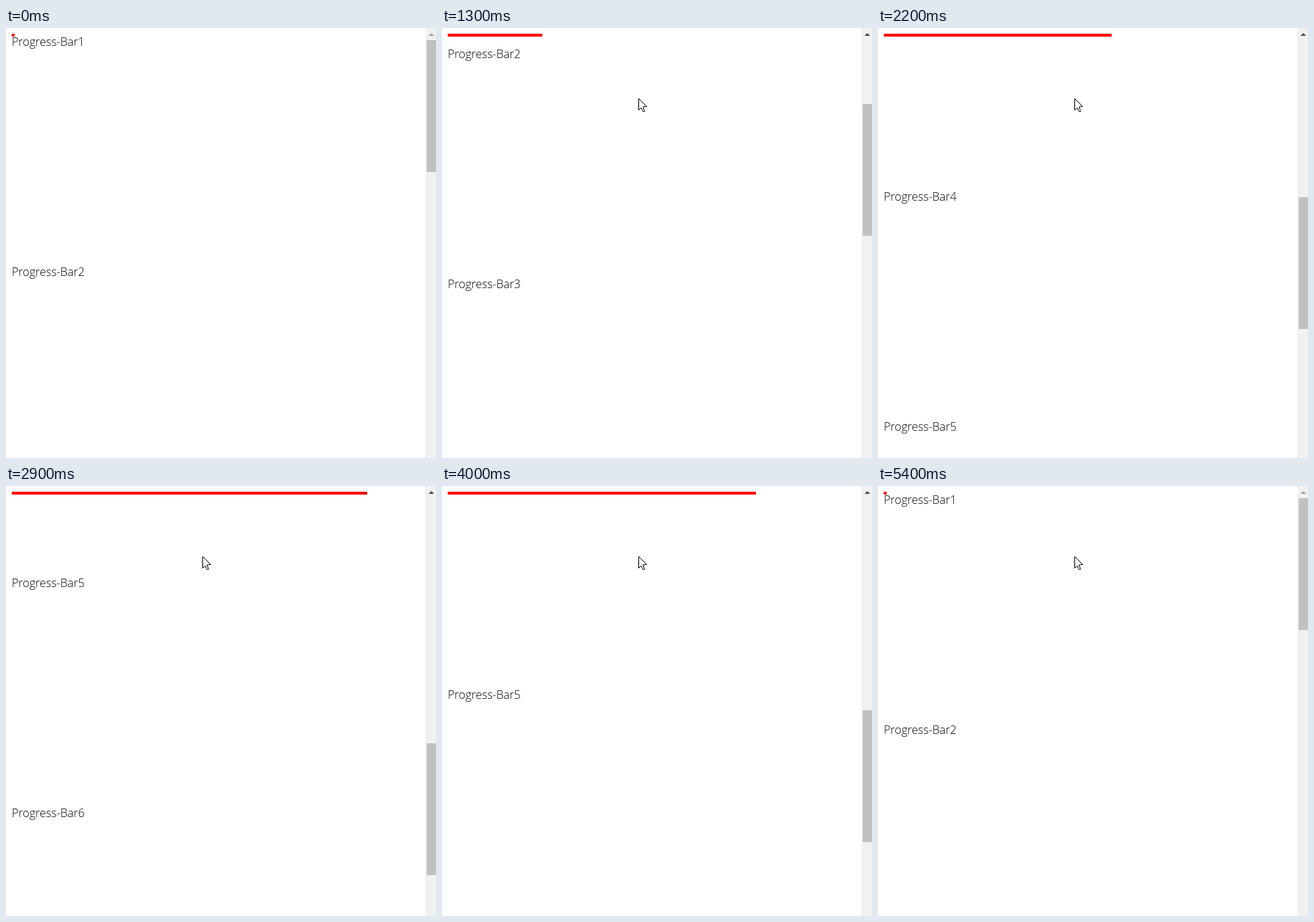
These frames come from a looping animation (600x600 px, 6500 ms). An HTML page with a canvas:

```html
<!DOCTYPE html>
<html lang="en">
<head>
<meta charset="utf-8">
<title>Scroll progress bar</title>
<style>
  html, body { margin: 0; width: 100%; height: 100%; overflow: hidden; background: #fff; }
  canvas { display: block; }
</style>
</head>
<body>
<canvas id="stage" width="600" height="600"></canvas>
<script>
const ctx = document.getElementById('stage').getContext('2d');
const LOOP = 6500, STEP = 100;
const SECTION = 321, SECTIONS = 6;

// Wheel gestures: each eases the page to a new offset; power 1 is linear
const gestures = [
  { from: 800, until: 1600, to: 499, power: 0.96 },
  { from: 1600, until: 2500, to: 985, power: 0.65 },
  { from: 2700, until: 3300, to: 1390, power: 1.483 },
  { from: 3700, until: 4200, to: 919, power: 1.77 },
  { from: 4300, until: 4600, to: 842, power: 1 },
  { from: 4700, until: 5000, to: 510, power: 4.43 },
  { from: 5100, until: 5400, to: 0, power: 4.43 }
];

const easeOut = (k, power) => 1 - (1 - k) ** power;
const progress = (t, from, until) => Math.min(1, Math.max(0, (t - from) / (until - from)));

function scrollAt(t) {
  let pos = 0;
  for (const { from, until, to, power } of gestures) {
    pos += (to - pos) * easeOut(progress(t, from, until), power);
  }
  return Math.round(pos);
}

function rect(color, x, y, w, h) {
  ctx.fillStyle = color;
  ctx.fillRect(x, y, w, h);
}

function polygon(points) {
  ctx.beginPath();
  points.forEach(([x, y]) => ctx.lineTo(x, y));
  ctx.closePath();
}

function drawLabels(pos) {
  ctx.font = '300 16px "Open Sans", "Noto Sans", sans-serif';
  ctx.fillStyle = '#000';
  for (let i = 0; i < SECTIONS; i++) {
    ctx.fillText('Progress-Bar' + (i + 1), 8, 25 + i * SECTION - pos);
  }
}

function drawScrollbar(pos) {
  rect('#f1f1f1', 585, 0, 15, 600);
  rect('#c1c1c1', 587, Math.floor(17 + pos * 0.2932), 13, 184);
  ctx.fillStyle = pos > 0 ? '#505050' : '#a3a3a3';
  polygon([[593.5, 7], [597.5, 11], [589.5, 11]]);
  ctx.fill();
}

function drawCursor(t) {
  const k = easeOut(progress(t, 200, 600), 1.3);
  ctx.save();
  ctx.translate(Math.round(49 + 225 * k) + 0.5, Math.round(143 - 45 * k) + 0.5);
  polygon([[0, 0], [0, 16], [3.5, 13], [6, 18], [8, 18], [8, 17], [6, 11.5], [11, 11]]);
  ctx.fillStyle = '#fff';
  ctx.fill();
  ctx.strokeStyle = '#000';
  ctx.stroke();
  ctx.restore();
}

function draw(t) {
  const pos = scrollAt(t);
  rect('#fff', 0, 0, 600, 600);
  drawLabels(pos);
  rect('#f00', 8, 8, Math.round(4 + pos * 0.421), 4);
  drawScrollbar(pos);
  if (t >= 200) drawCursor(t);
}

const start = performance.now();
function tick() {
  const t = (performance.now() - start) % LOOP;
  draw(Math.floor(t / STEP) * STEP);
  requestAnimationFrame(tick);
}
tick();
</script>
</body>
</html>
```
